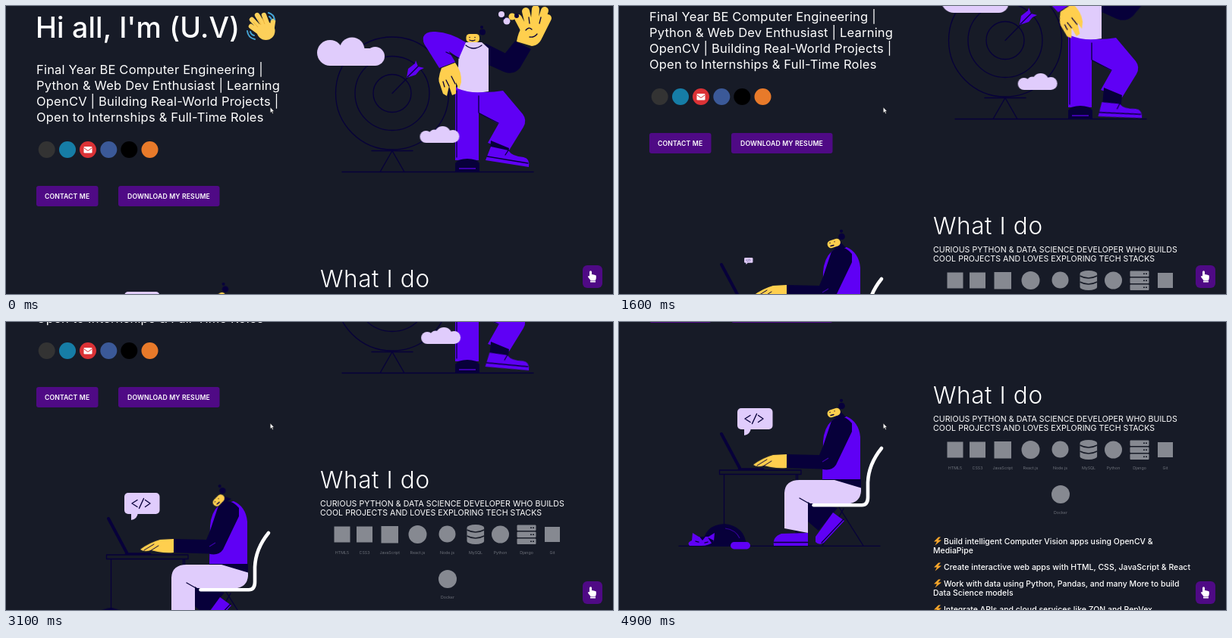
Animation, 800 px wide and 381 px high, one loop 5 s. Source, as an HTML page:

```html
<!DOCTYPE html>
<html lang="en">
<head>
<meta charset="utf-8">
<title>Portfolio</title>
<style>
html, body { margin: 0; width: 100%; height: 100%; overflow: hidden; background: #171b27; }
svg { display: block; width: 100%; height: 100%; }
text { font-family: Inter, "Open Sans", sans-serif; fill: #fff; white-space: pre; }
.hi { font-size: 37.5px; font-weight: 500; letter-spacing: .2px; }
.lead { font-size: 16.5px; letter-spacing: .2px; }
.btn { font-size: 8.7px; font-weight: 600; letter-spacing: .12px; text-anchor: middle; }
.head { font-size: 31.5px; font-weight: 300; letter-spacing: .6px; }
.item { font-size: 10.5px; font-weight: 500; }
.caps { font-size: 10.6px; font-weight: 400; letter-spacing: .05px; }
.tag text { font-size: 5.3px; fill: #6d717a; text-anchor: middle; }
.tag { fill: #868991; }

.p { fill: #5f00f5; }
.d { fill: #07003a; }
.l { fill: #e0ccfc; }
.y { fill: #ffcf4e; }
.b { fill: #4f0a85; }
.ln { fill: none; stroke: #07003a; stroke-width: 1.3; stroke-linecap: round; stroke-linejoin: round; }
.pl { fill: none; stroke: #5f00f5; stroke-width: 1.2; }
.finger { fill: none; stroke: #ffcf4e; stroke-width: 10; stroke-linecap: round; }

.page, .page .a { animation: 5s infinite cubic-bezier(.37, 0, .63, 1); }
.page { animation-name: scroll; }
.page .wave { animation: wave 2.5s infinite; transform-origin: 344px 34px; }
.page .near { animation-name: near; }
.page .far { animation-name: far; }
.page .fore { animation-name: fore; transform-origin: 557px 43px; }
.page .lift { animation-name: lift; transform-origin: 664px 78px; }
.page .foot { animation-name: foot; transform-origin: 689px 211px; }
.page .nod { animation-name: nod; transform-origin: 290px 128px; }
.page .pop { animation-name: pop; transform-origin: 168px 147px; }
.page .type { animation: type .8s infinite ease-in-out; transform-origin: 221px 184px; }
.page .purr { animation: purr 2.5s infinite ease-in-out; transform-origin: 140px 296px; }

@keyframes scroll {
  0% { transform: none; }
  14% { transform: translateY(0); animation-timing-function: steps(6); }
  26% { transform: translateY(-42px); animation-timing-function: steps(6); }
  38% { transform: translateY(-98px); animation-timing-function: steps(6); }
  50% { transform: translateY(-122.5px); animation-timing-function: steps(6); }
  62% { transform: translateY(-152px); animation-timing-function: steps(11); }
  84% { transform: translateY(-217px); animation-timing-function: steps(6); }
  96%, 100% { transform: translateY(-264px); }
}
@keyframes wave {
  0%, 50%, 100% { transform: rotate(0); }
  10%, 30% { transform: rotate(-10deg); }
  20% { transform: rotate(12deg); }
  40% { transform: rotate(9deg); }
}
@keyframes near {
  0% { transform: translateX(8.5px); animation-timing-function: cubic-bezier(.3, .2, .6, 1); }
  30% { transform: translateX(-11.5px); }
  68% { transform: translateX(11.5px); }
  100% { transform: translateX(-8px); }
}
@keyframes far {
  0% { transform: translateX(0); animation-timing-function: cubic-bezier(.3, .2, .6, 1); }
  30% { transform: translateX(14.5px); }
  68% { transform: translateX(-2px); }
  100% { transform: translateX(12px); }
}
@keyframes fore { 0%, 64% { transform: rotate(0); } 32%, 96%, 100% { transform: rotate(-12deg); } }
@keyframes lift { 0%, 56% { transform: rotate(0); } 28%, 84%, 100% { transform: rotate(10deg); } }
@keyframes foot {
  0%, 50%, 98%, 100% { transform: none; }
  26%, 74% { transform: translateY(6px) rotate(-8deg); }
}
@keyframes nod {
  0% { transform: rotate(-15deg); }
  24%, 38% { transform: rotate(0); }
  50%, 63% { transform: rotate(-27deg); }
  82%, 100% { transform: rotate(0); }
}
@keyframes pop {
  0%, 28% { transform: scale(1); }
  34%, 54% { transform: scale(0); }
  60%, 100% { transform: scale(1); }
}
@keyframes type { 50% { transform: rotate(2deg); } }
@keyframes purr { 50% { transform: scaleY(1.04); } }
</style>
</head>
<body>
<svg viewBox="0 0 800 381">
<defs>
  <path id="bolt" fill="#f7a52b" d="M421-9l-6 6h4l-2.500 5 8.500-7h-4.500l3.500-4z"/>
</defs>

<g class="page">
  <!-- greeting -->
  <text class="hi" x="39" y="42">Hi all, I'm (U.V)</text>
  <g class="wave">
    <circle cx="342.500" cy="33" r="12" fill="#fdd05a"/>
    <path d="M338 38L323 27M339 34L324 18M342 30L331 12M346 28L340 12M350 33L352 20" fill="none" stroke="#fdd05a" stroke-width="6.400" stroke-linecap="round"/>
    <path d="M332 28l-6-7M336 25l-4-8M341 24l-3-8" fill="none" stroke="#e8ac35" stroke-width=".8"/>
    <path d="M346 9q7 2 8 9M318 33q1 9 10 11M347 14q2 1 3 4M322 34q1 4 5 5" fill="none" stroke="#45a3d3" stroke-width="2" stroke-linecap="round"/>
  </g>
  <g class="lead">
    <text x="40" y="90">Final Year BE Computer Engineering |</text>
    <text x="40" y="111">Python &amp; Web Dev Enthusiast | Learning</text>
    <text x="40" y="132">OpenCV | Building Real-World Projects |</text>
    <text x="40" y="153">Open to Internships &amp; Full-Time Roles</text>
  </g>

  <circle cx="53.700" cy="190" r="11" fill="#333"/>
  <circle cx="81" cy="190" r="11" fill="#167da6"/>
  <circle cx="108" cy="190" r="11" fill="#db3236"/>
  <rect x="102.500" y="186" width="11" height="8.500" rx="1.200" fill="#fff"/>
  <path d="M102.500 187.500l5.500 4 5.500-4" fill="none" stroke="#db3236"/>
  <circle cx="135.300" cy="190" r="11" fill="#3b5998"/>
  <circle cx="162.300" cy="190" r="11"/>
  <circle cx="189.500" cy="190" r="11" fill="#e87a2a"/>

  <rect class="b" x="40" y="238" width="81.500" height="27" rx="3"/>
  <text class="btn" x="80.600" y="254.500">CONTACT ME</text>
  <rect class="b" x="148" y="238" width="133.500" height="27" rx="3"/>
  <text class="btn" x="214.500" y="254.500">DOWNLOAD MY RESUME</text>

  <!-- dartboard -->
  <g class="ln">
    <circle cx="509" cy="115.500" r="74.500"/>
    <circle cx="509" cy="115.500" r="49"/>
    <circle cx="509" cy="115.500" r="25"/>
    <path d="M509 115.500L531 93M482 191.500h54M509 191.500l-16 28M509 191.500l16 28M443 219.500h252"/>
  </g>
  <path class="p" d="M528 95l2-12 9-7 1-4 3 8 8 2-6 3-5 6z"/>
  <path class="ln" d="M529 94l14-14"/>
  <g class="a far l">
    <circle cx="427" cy="62" r="17"/><circle cx="456" cy="58" r="16.500"/>
    <circle cx="486.500" cy="66.500" r="12.500"/><rect x="426" y="56" width="61" height="23"/>
  </g>

  <!-- standing figure -->
  <path class="p" d="M592 107Q622 118 655 112L681 143Q687 151 682 160L663 191L635 181L649 156L623 141V204H592Z"/>
  <path class="ln" d="M623 141V119M624 142l25 13M594 112v88"/>
  <path class="d" d="M592 219V208Q596 202 608 202Q620 202 624 208V219Z"/>
  <path class="pl" d="M597 215h22"/>
  <path class="d" d="M639 178l24 10-2 19-24-4z"/>
  <g class="a foot">
    <path class="p" d="M639 186l23 5q5 8 20 9 9 2 7 13l-57-9z"/>
    <path class="ln" d="M634 199l54 9M662 191l-4 6"/>
  </g>
  <path class="d" d="M631 49L657 62L672 70L678 81Q670 92 656 87L634 77Z"/>
  <path class="l" d="M597 55L606 48H627L636 56V113Q614 117 595 109Z"/>
  <g class="a lift">
    <path class="d" d="M655 66l16-20 21 11-14 24q-9 11-21 6z"/>
    <path class="finger" d="M687 39L675 16M691 32L685 7M696 30L698 4M702 31L710 6M703 38L714 16"/>
    <path class="y" d="M673 47q4-24 18-25 19 1 17 16-4 14-15 15z"/>
    <path class="ln" d="M685 32q4-5 8-1M690 41q6 1 10-4M690 23l-1-8M703 23l2-8"/>
  </g>
  <g class="l">
    <circle cx="653" cy="11" r="4"/><circle cx="660" cy="20" r="4.500"/>
    <circle class="y" cx="667" cy="14" r="4.500"/><circle class="d" cx="673" cy="13" r="3"/>
    <circle class="d" cx="656" cy="16" r="1.600"/>
  </g>
  <circle class="d" cx="628" cy="34.500" r="4"/><circle class="d" cx="627" cy="28" r="2"/>
  <rect class="y" x="606.500" y="37" width="17.500" height="11" rx="4.500"/>
  <path class="ln" d="M611 41.500h.1M618 41.500h.1M611 45q4 2 7 0M606 52q10 8 21 0"/>
  <path class="p" d="M566 34Q553 33 550 41Q549 48 554 54L570 62L584 60L597 69L606 48Q586 35 566 34Z"/>
  <g class="a fore">
    <path class="p" d="M550 41q-1 6 3 12l18 29 21-8-15-25-14-9z"/>
    <path class="y" d="M574 82l18-7q9 12 8 26l-3 9-4-9 0 15-5 2-4-12-3 13-5-3-4-12q-4-6 2-22z"/>
    <path class="ln" d="M580 98l4 8M587 93l5 10M576 100l2 7"/>
  </g>
  <path class="ln" d="M580 61l17 8"/>
  <g class="a near l">
    <circle cx="545" cy="173" r="8"/><circle cx="567" cy="170" r="11"/>
    <circle cx="580.500" cy="172.500" r="8.500"/><circle cx="556" cy="171" r="7.500"/><rect x="545" y="170" width="36" height="11"/>
  </g>

  <!-- second section -->
  <g transform="translate(0 264)">
    <text class="head" x="414" y="108">What I do</text>
    <g class="caps">
      <text x="414" y="132">CURIOUS PYTHON &amp; DATA SCIENCE DEVELOPER WHO BUILDS</text>
      <text x="414" y="144.300">COOL PROJECTS AND LOVES EXPLORING TECH STACKS</text>
    </g>
    <g class="item">
      <use href="#bolt" y="293.500"/>
      <text x="428" y="293.500">Build intelligent Computer Vision apps using OpenCV &amp;</text>
      <text x="414" y="305.500">MediaPipe</text>
      <use href="#bolt" y="327.500"/>
      <text x="428" y="327.500">Create interactive web apps with HTML, CSS, JavaScript &amp; React</text>
      <use href="#bolt" y="349.500"/>
      <text x="428" y="349.500">Work with data using Python, Pandas, and many More to build</text>
      <text x="414" y="361.500">Data Science models</text>
      <use href="#bolt" y="383.500"/>
      <text x="428" y="383.500">Integrate APIs and cloud services like ZQN and RepVex</text>
    </g>
    <g class="tag">
      <rect x="432.500" y="158.500" width="21" height="21"/><text x="443" y="195">HTML5</text>
      <rect x="462" y="158.500" width="21" height="21"/><text x="472.500" y="195">CSS3</text>
      <rect x="494.500" y="158" width="22.500" height="22.500"/><text x="505.700" y="195">JavaScript</text>
      <circle cx="542.500" cy="169" r="12"/><text x="542.500" y="195">React.js</text>
      <circle cx="581.500" cy="168.500" r="11"/><text x="581.500" y="195">Node.js</text>
      <path d="M607.500 160a11.300 4 0 0 1 22.600 0v18a11.300 4 0 0 1-22.600 0z"/>
      <path d="M607.500 163q11.300 6 22.600 0M607.500 171q11.300 6 22.600 0" fill="none" stroke="#171b27" stroke-width="1.500"/>
      <text x="619" y="195">MySQL</text>
      <circle cx="651.500" cy="169" r="11.500"/><text x="651.500" y="195">Python</text>
      <path d="M674 157h24v6.500h-24zM674 166h24v6.500h-24zM674 175h24v6.500h-24z" stroke="#868991" stroke-linejoin="round"/>
      <path d="M691 160.200h5M691 169.200h5M691 178.200h5" stroke="#171b27" stroke-width="1.600" stroke-dasharray="2 1"/>
      <text x="686" y="195">Django</text>
      <rect x="710" y="159" width="20" height="20"/><text x="720" y="195">Git</text>
      <circle cx="582" cy="228" r="12"/><text x="582" y="253.500">Docker</text>
    </g>

    <!-- speech bubble -->
    <g class="a pop">
      <rect class="l" x="156" y="114" width="46.500" height="28" rx="5"/>
      <path class="l" d="M165 140v10q8-1 9-10z"/>
      <path class="ln" style="stroke-width:1.400" d="M173 123.500l-7 4.500 7 4.500M181.500 121.500l-6 13M183.500 123.500l6.500 4.500-6.500 4.500"/>
    </g>

    <!-- desk, chair and cat -->
    <path class="ln" d="M79 296.300H344M138.500 202V296M233.500 202V296M235.500 202V296M290 245l32 51M296 247l-28 49"/>
    <rect class="ln" x="132.500" y="196" width="107.500" height="5.500"/>
    <path class="ln" style="stroke-width:4" d="M135 148l24 45"/>
    <path class="ln" style="stroke-width:2.400" d="M158 194.500h32"/>
    <g class="purr">
      <path class="d" d="M110 296Q112 268 139 267Q166 270 168 296Z"/>
      <path class="pl" d="M140 273q14 2 19 13" opacity=".5"/>
      <path class="p" d="M97 279l8 5h13l8-5-1 11q-6 6-17 6H93q-4-4 3-7z"/>
      <path class="d" d="M106 284l4 5 4-5zM117 285l8 4-2 5z"/>
      <path class="ln" d="M101 290l4 1M113 292l4-1"/>
    </g>
    <rect class="p" x="147" y="291" width="26" height="9.500" rx="4.700"/>

    <!-- seated figure -->
    <path class="d" d="M249 238L288 246L263 276L249 264Z"/>
    <path class="p" d="M259 284l23-32 15 11-27 29q-6 4-11-1z"/>
    <path class="ln" d="M267 292l29-31"/>
    <path class="p" d="M204 296q-2-12 10-16l35-1v17z"/>
    <path class="ln" d="M204 291.500h45"/>
    <path class="d" d="M268 206L319 208V221H268Z"/>
    <path class="l" d="M218 226Q219 209 238 209H284L319 219.500Q320 237 305 240H252L249 238V279L218 273Z"/>
    <path class="ln" d="M238 233l14 8"/>
    <path class="p" d="M281 130Q270 140 269 158L268 208H318V152Q316 132 300 125Z"/>
    <path class="d" d="M280 131Q294 118 307 134L307 145L286 189Q280 198 267 194.500L219 193L220 175L264 176L269 164Z"/>
    <path class="pl" d="M276 180l-8 5" opacity=".6"/>
    <g class="type">
      <path class="y" d="M221 175l-18 1q-14 4-26 13 5 4 14 1l9 2q11 2 21 1z"/>
      <path class="ln" style="stroke-width:1" d="M182 190l13-8M190 191l11-7"/>
    </g>
    <g class="a nod">
      <circle class="d" cx="293.500" cy="111" r="4.300"/><circle class="d" cx="293" cy="103.800" r="2.100"/>
      <path class="d" d="M283 127l8-10 8 9z"/>
      <rect class="y" x="274.500" y="115" width="17.500" height="10" rx="4.700" transform="rotate(-18 283 120)"/>
      <path class="ln" d="M278 119.500h.1M284 117.800h.1M279 123.500l4-1"/>
    </g>
    <path d="M256.500 242.300H320Q328 242 328 232V212Q329 188 346 167" fill="none" stroke="#fff" stroke-width="4.600" stroke-linecap="round"/>
  </g>
</g>

<!-- fixed overlay -->
<rect class="b" x="760" y="343" width="26" height="30" rx="6"/>
<path fill="#fff" d="M769 352q0-1.800 1.500-1.800t1.500 1.800v3.200q1.500-.6 2.200.4 1.500-.5 2 .5 1.600-.2 1.600 1.400v2.300q0 1.500-1 3.200h-6.300l-3.300-4.300q-.6-1.600.8-1.700l1 .5z"/>
<rect x="770" y="363.500" width="7" height="2" rx=".6" fill="#fff"/>
<path d="M348.300 134v7.200l1.700-1.500 1.200 2.700 1.100-.5-1.200-2.600h2.200z" fill="#fff" stroke="#111" stroke-width=".4"/>
</svg>
</body>
</html>
```
